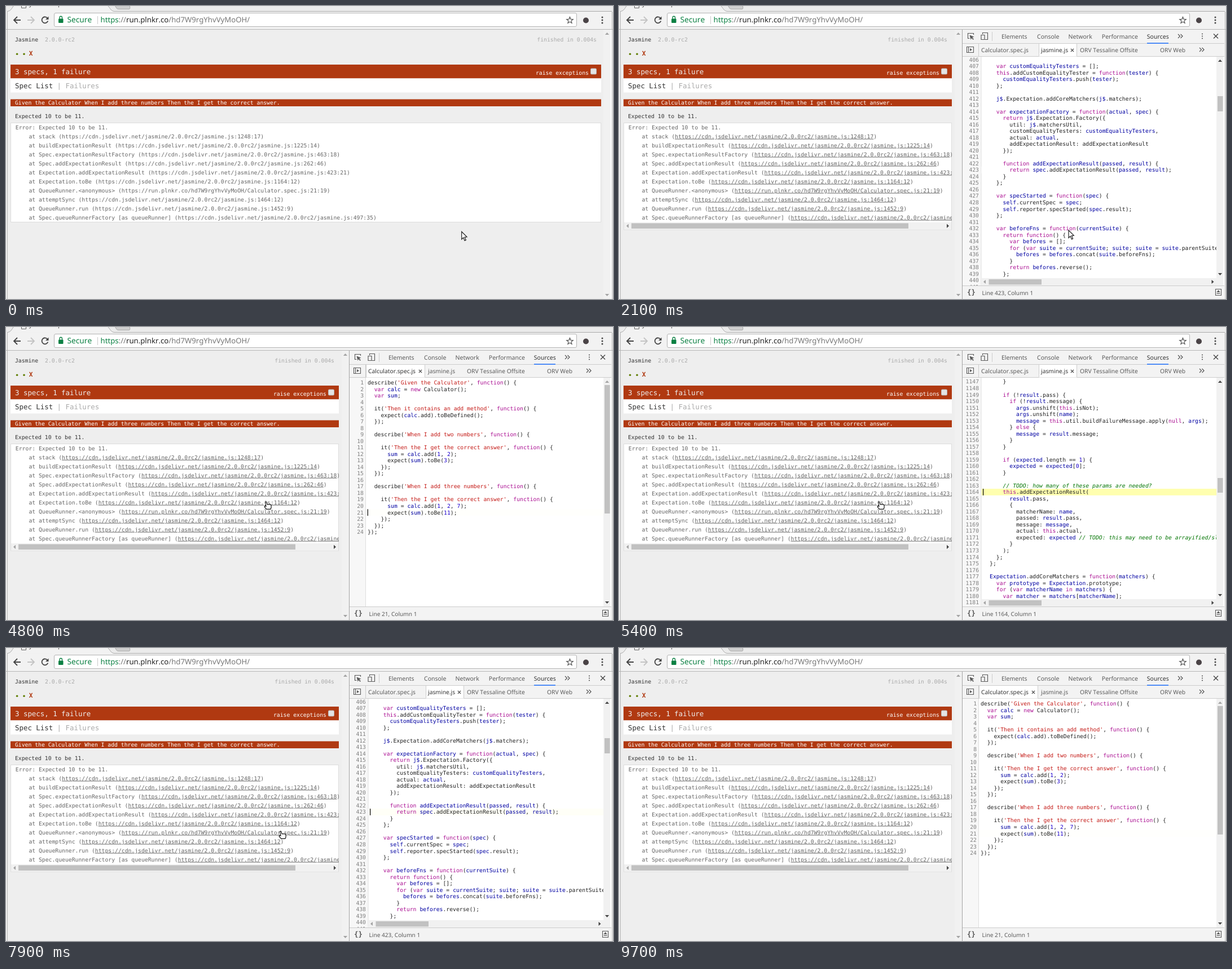
These frames come from a looping animation (1076 by 520 pixels, 9800 ms). An HTML page:

```html
<!DOCTYPE html>
<html lang="en">
<head>
<meta charset="utf-8">
<title>Stack trace navigation</title>
<style>
html, body { margin: 0; width: 100%; height: 100%; overflow: hidden; background: #fff; }
svg { display: block; width: 1076px; height: 520px; }
text { white-space: pre; text-rendering: geometricPrecision; font-kerning: none; }
.m { font-family: "DejaVu Sans Mono", monospace; font-size: 9.75px; }
.b { font-size: 12.4px; }
.x { font-size: 11.2px; }
.u { font-family: "Noto Sans", "Open Sans", sans-serif; }
.linked .url { text-decoration: underline; }
.kw { fill: #aa0d91; }
.str { fill: #c41a16; }
.num { fill: #1c00cf; }
.loc { fill: #0000a2; }
.com { fill: #007400; font-style: italic; }
.plain tspan { fill: #222; font-style: normal; }
</style>
</head>
<body>
<svg id="stage" viewBox="0 0 1076 520" xmlns="http://www.w3.org/2000/svg"></svg>
<script>
const LOOP = 9800, STEP = 100;
const LINE = 11.52;
const GREY = '#5a5a5a', RED = '#b03911', EDGE = '#ccc';

const esc = s => s.replace(/&/g, '&amp;').replace(/</g, '&lt;');
const rect = (x, y, w, h, fill, more = '') =>
  `<rect x="${x}" y="${y}" width="${w}" height="${h}" fill="${fill}" ${more}/>`;
const path = (d, stroke, w = 1.3, fill = 'none') =>
  `<path d="${d}" stroke="${stroke}" stroke-width="${w}" fill="${fill}"/>`;
const disc = (x, y, r, fill) => `<circle cx="${x}" cy="${y}" r="${r}" fill="${fill}"/>`;
const mono = (x, y, s, fill, more = '', cls = '') =>
  `<text class="m ${cls}" x="${x}" y="${y}" fill="${fill}" ${more}>${s}</text>`;
const ui = (x, y, s, size, fill = GREY) =>
  `<text class="u" x="${x}" y="${y}" font-size="${size}" fill="${fill}">${s}</text>`;
const group = (id, body) => `<g id="${id}">${body}</g>`;

// Scrollbar arrow head: direction is one of u, d, l, r
const arrow = (x, y, dir, fill) => {
  const turn = { u: 0, r: 90, d: 180, l: 270 }[dir];
  return `<path d="M-3.6 2L0-2 3.6 2Z" fill="${fill}" transform="translate(${x} ${y}) rotate(${turn})"/>`;
};
const dots = (x, y, r, gap, fill) => [-gap, 0, gap].map(d => disc(x, y + d, r, fill)).join('');
const chevrons = (x, y) =>
  path(`M${x} ${y - 3.5}l3.5 3.5-3.5 3.5M${x + 4.5} ${y - 3.5}l3.5 3.5-3.5 3.5`, GREY);
const cross = (x, y, r, w) =>
  path(`M${x - r} ${y - r}l${2 * r} ${2 * r}M${x + r} ${y - r}l${-2 * r} ${2 * r}`, '#444', w);

/* ---------- browser frame ---------- */
function browser() {
  const star = Array.from({ length: 10 }, (_, i) => {
    const a = (i * 36 - 90) * Math.PI / 180, r = i % 2 ? 2.6 : 6;
    return `${(999.5 + r * Math.cos(a)).toFixed(2)} ${(25.5 + r * Math.sin(a)).toFixed(2)}`;
  }).join('L');
  return rect(0, 0, 1076, 520, '#f2f2f2') +
    rect(0, 0, 1076, 9, '#ebebeb') +
    path('M2 9.5C9 9 10 4 14-1H180C185 4 186 9 192 9.5', '#a9a9a9', 1, '#f2f2f2') +
    path('M192 9.5H1074', '#a9a9a9', 1) +
    path('M193-1L196 4Q197 5.5 200 5.5H218Q221 5.5 219-1Z', '#aaa', 1, '#cfcfcf') +
    path('M27.5-1V3.5H35.5V-1', '#666', 1) +
    ui(41, 0, 'y', 10.4, '#444') + ui(92, 0, 'p', 10.4, '#444') +
    path('M26 25H14.5M20 19l-6 6 6 6', '#444', 1.8) +
    path('M38 25H49.5M44 19l6 6-6 6', '#c4c4c4', 1.8) +
    path('M73.5 21.5A5.5 5.5 0 1 0 74.3 26.5', '#444', 1.8) +
    '<path d="M75.5 18.5V24H70Z" fill="#444"/>' +
    rect(85.5, 12.5, 926, 24, '#fff', 'rx="2.5" stroke="#b3b3b3"') +
    rect(93, 22.5, 8.5, 7.5, '#0b8043', 'rx="1"') +
    path('M95 23V20.5a2.25 2.25 0 0 1 4.5 0V23', '#0b8043', 1.3) +
    ui(108.5, 29.3, 'Secure', 13.7, '#0b8043') +
    rect(162, 18, 1, 14, '#c8c8c8') +
    ui(167.5, 29.3, '<tspan fill="#0b8043">https</tspan>://<tspan fill="#222">run.plnkr.co</tspan>/hd7W9rgYhvVyMoOH/', 13.2, '#777') +
    path(`M${star}Z`, '#555', 1.2) +
    disc(1028, 25.5, 5, '#4a4346') +
    dots(1057, 25, 1.5, 5, '#444') +
    rect(3, 42, 1071, 478, '#fff') +
    rect(0, 41, 1076, 1, '#b6b6b6') +
    rect(2, 10, 1, 510, '#b0b0b0') + rect(1074, 10, 1, 510, '#b0b0b0');
}

/* ---------- test report ---------- */
const CDN = 'https://cdn.jsdelivr.net/jasmine/2.0.0rc2/jasmine.js:';
const STACK = [
  ['stack', CDN + '1248:17'],
  ['buildExpectationResult', CDN + '1225:14'],
  ['Spec.expectationResultFactory', CDN + '463:18'],
  ['Spec.addExpectationResult', CDN + '262:46'],
  ['Expectation.addExpectationResult', CDN + '423:21'],
  ['Expectation.toBe', CDN + '1164:12'],
  ['QueueRunner.<anonymous>', 'https://run.plnkr.co/hd7W9rgYhvVyMoOH/Calculator.spec.js:21:19'],
  ['attemptSync', CDN + '1464:12'],
  ['QueueRunner.run', CDN + '1452:9'],
  ['Spec.queueRunnerFactory [as queueRunner]', CDN + '497:35'],
];

function report(id, right, scrolls) {
  const w = right - 8, bar = right + (scrolls ? 5 : 4);
  const trace = STACK.map(([fn, url], i) =>
    mono(40.4, 234.7 + 16 * i, `at ${esc(fn)} (<tspan class="url">${url}</tspan>)`, '#666')).join('');
  return group(id,
    rect(3, 42, bar + 10, 478, '#eee') +
    rect(bar, 42, 13, 478, '#f1f1f1') +
    arrow(bar + 6.5, 49, 'u', '#a3a3a3') + arrow(bar + 6.5, 513, 'd', '#a3a3a3') +
    mono(16, 63, 'Jasmine', '#333') + mono(69, 63, '2.0.0-rc2', '#aaa') +
    mono(right - 8, 63, 'finished in 0.004s', '#aaa', 'text-anchor="end"') +
    disc(19.6, 85.3, 1.8, '#5e7d00') + disc(32, 85.3, 1.8, '#5e7d00') +
    mono(40.7, 88, 'X', RED, 'font-weight="bold"', 'x') +
    rect(8, 104, w, 24.5, RED) +
    mono(16, 120.7, '3 specs, 1 failure', '#eee', '', 'b') +
    mono(right - 116, 122.3, 'raise exceptions', '#fff') +
    rect(right - 18.5, 111, 10, 10, '#e4e4e4', 'rx="1.5" stroke="#b9b9b9"') +
    rect(8, 128.5, w, 25, '#fff') +
    mono(16, 145.5, 'Spec List <tspan fill="#aaa">| Failures</tspan>', '#333', '', 'b') +
    rect(8, 165.5, w, 12.5, RED) +
    mono(16, 174.8, 'Given the Calculator When I add three numbers Then the I get the correct answer.', '#fff') +
    mono(16, 199.3, 'Expected 10 to be 11.', '#333') +
    rect(8.5, 207.5, w - 1, scrolls ? 189.5 : 176, '#fff', 'stroke="#ddd"') +
    `<g clip-path="url(#${scrolls ? 'cutNarrow' : 'cutWide'})">` +
    mono(16.8, 219, 'Error: Expected 10 to be 11.', '#666') + trace + '</g>' +
    (scrolls ? rect(9, 384, w - 2, 12.5, '#f1f1f1') + rect(22, 385.5, 491, 9.5, '#c1c1c1') +
      arrow(15, 390.3, 'l', '#a3a3a3') + arrow(583, 390.3, 'r', '#444') : ''));
}

/* ---------- developer tools ---------- */
function toolbar() {
  const tab = (x, s, fill) => ui(x, 57.5, s, 10.5, fill);
  return group('tools',
    rect(608, 42, 466, 478, '#fff') + rect(608, 42, 1, 478, '#a3a3a3') +
    rect(609, 42, 464, 24, '#f3f3f3') + rect(609, 66, 464, 1, EDGE) +
    path('M621.5 57.5H618.5V48.5H628.5V51', GREY, 1.2) +
    `<path d="M621.5 51.5l8 3.2-3.3 1.2 2.8 2.8-1.3 1.3-2.8-2.9-1.3 3Z" fill="${GREY}"/>` +
    path('M644.5 50V47.5H653.5V59.5H648.5', GREY, 1.2) +
    path('M642 51.5H648V59.5H642Z', GREY, 1.2, '#f3f3f3') +
    rect(661, 46, 1, 16, EDGE) +
    tab(678, 'Elements') + tab(741, 'Console') + tab(796.5, 'Network') +
    tab(855.8, 'Performance') + tab(935.8, 'Sources', '#333') +
    rect(936, 65.2, 38, 1.8, '#3e82f7') +
    chevrons(991, 53.5) + dots(1034, 53.5, 1.1, 4, GREY) + cross(1058, 53.5, 4, 1.4));
}

function highlight(line) {
  const KEYS = /^(var|new|function|return|if|else|for|in|this|null)$/;
  const OUTER = /^(describe|it|expect|Calculator|addExpectationResult)$/;
  return line.replace(/\/\/.*|'[^']*'|[\w$]+/g, (s, at) => {
    const member = line[at - 1] === '.' || line[at + s.length] === ':';
    const named = line.slice(0, at).endsWith('function ');
    const cls = s.startsWith('//') ? 'com' : s[0] === "'" ? 'str' : /^\d/.test(s) ? 'num' :
      KEYS.test(s) ? 'kw' : member || (OUTER.test(s) && !named) ? '' : 'loc';
    return cls ? `<tspan class="${cls}">${s}</tspan>` : s;
  });
}

const VIEWS = {
  spec: { first: 1, at: 21, mid: 329.1, col: 641, lines: `describe('Given the Calculator', function() {
  var calc = new Calculator();
  var sum;

  it('Then it contains an add method', function() {
    expect(calc.add).toBeDefined();
  });

  describe('When I add two numbers', function() {

    it('Then the I get the correct answer', function() {
      sum = calc.add(1, 2);
      expect(sum).toBe(3);
    });
  });

  describe('When I add three numbers', function() {

    it('Then the I get the correct answer', function() {
      sum = calc.add(1, 2, 7);
      expect(sum).toBe(11);
    });
  });
});` },
  matcher: { first: 1147, at: 1164, mid: 292.9, col: 645.3, thumb: [268, 26], lines: `      }

      if (!result.pass) {
        if (!result.message) {
          args.unshift(this.isNot);
          args.unshift(name);
          message = this.util.buildFailureMessage.apply(null, args);
        } else {
          message = result.message;
        }
      }

      if (expected.length == 1) {
        expected = expected[0];
      }

      // TODO: how many of these params are needed?
      this.addExpectationResult(
        result.pass,
        {
          matcherName: name,
          passed: result.pass,
          message: message,
          actual: this.actual,
          expected: expected // TODO: this may need to be arrayified/sliced
        }
      );
    };
  };

  Expectation.addCoreMatchers = function(matchers) {
    var prototype = Expectation.prototype;
    for (var matcherName in matchers) {
      var matcher = matchers[matcherName];
` },
  factory: { first: 406, at: 423, mid: 291, col: 645.3, thumb: [160, 27], lines: `
    var customEqualityTesters = [];
    this.addCustomEqualityTester = function(tester) {
      customEqualityTesters.push(tester);
    };

    j$.Expectation.addCoreMatchers(j$.matchers);

    var expectationFactory = function(actual, spec) {
      return j$.Expectation.Factory({
        util: j$.matchersUtil,
        customEqualityTesters: customEqualityTesters,
        actual: actual,
        addExpectationResult: addExpectationResult
      });

      function addExpectationResult(passed, result) {
        return spec.addExpectationResult(passed, result);
      }
    };

    var specStarted = function(spec) {
      self.currentSpec = spec;
      self.reporter.specStarted(spec.result);
    };

    var beforeFns = function(currentSuite) {
      return function() {
        var befores = [];
        for (var suite = currentSuite; suite; suite = suite.parentSuite) {
          befores = befores.concat(suite.beforeFns);
        }
        return befores.reverse();
      };

` },
};

function editor(id, v) {
  const isSpec = id === 'spec', edge = isSpec ? 637 : 641.5;
  const bottom = isSpec ? 496 : 483;
  const [thumbY, thumbH] = v.thumb || [103, 228];
  const base = n => v.mid + 3.4 + (n - v.at) * LINE;
  const lines = v.lines.split('\n');
  const numbers = lines.map((_, i) =>
    mono(isSpec ? 634 : 638, base(v.first + i), v.first + i, '#808080', 'text-anchor="end"')).join('');
  const code = lines.map((s, i) => s && mono(v.col, base(v.first + i), highlight(s), '#222')).join('');
  const tabBox = (x, w) => rect(x + .5, 67, w, 22.5, '#fff') +
    rect(x, 67, 1, 22, EDGE) + rect(x + w, 67, 1, 22, EDGE);
  const tab = (x, s, fill) => ui(x, 82, s, 10.3, fill);

  return group(id,
    rect(609, 67, 464, 22, '#f3f3f3') + rect(609, 89, 464, 1, EDGE) +
    path('M616.5 72.5H628.5V82.5H616.5ZM619.5 72.5V82.5', GREY, 1.1) +
    `<path d="M622 75l4 2.5-4 2.5Z" fill="${GREY}"/>` + rect(637, 67, 1, 22, EDGE) +
    (isSpec ? tabBox(638, 104) + cross(734.5, 78.5, 2.6, 1.3) : tabBox(744, 67) + cross(803.5, 78.5, 2.6, 1.3)) +
    tab(642, 'Calculator.spec.js', isSpec ? '#333' : GREY) + tab(748, 'jasmine.js', isSpec ? GREY : '#333') +
    tab(817, 'ORV Tessaline Offsite') + tab(959, 'ORV Web') + chevrons(1029, 77.5) +
    '<g clip-path="url(#cutCode)">' +
    rect(609, 90, edge - 609, 406, '#f7f7f7') + rect(edge, 90, 1, 406, '#ddd') + numbers +
    rect(edge + 1, v.mid - 5.8, 1059 - edge - 1, 11.7, '#fff', 'class="flash"') + code +
    rect(v.col - .3, v.mid - 5.8, 1.2, 11.7, '#000', 'class="caret"') + '</g>' +
    rect(1059, 90, 12.5, 406, '#f1f1f1') + rect(1061, thumbY, 9.5, thumbH, '#c1c1c1') +
    arrow(1065.5, 97, 'u', isSpec ? '#a3a3a3' : '#444') + arrow(1065.5, bottom - 7, 'd', '#444') +
    (isSpec ? '' : rect(642, 483, 417, 13, '#f1f1f1') + rect(655.5, 485, 93.5, 9.5, '#c1c1c1') +
      arrow(648, 489.5, 'l', '#a3a3a3') + arrow(1052.5, 489.5, 'r', '#444')) +
    rect(609, 496, 464, 24, '#f3f3f3') + rect(609, 496, 464, 1, EDGE) +
    mono(617, 512, '{}', GREY, 'font-weight="bold"', 'b') +
    ui(643.5, 512.7, `Line ${v.at}, Column 1`, 10.15) +
    path('M1057.5 502.5H1067.5V513.5H1057.5Z', GREY, 1.1) +
    `<path d="M1059.5 508l3-4 3 4Z" fill="${GREY}"/>` + rect(1059.5, 509.5, 6, 1.3, GREY));
}

/* ---------- scene ---------- */
const clip = (id, x, y, w, h) => `<clipPath id="${id}">${rect(x, y, w, h, '#000')}</clipPath>`;
const stage = document.getElementById('stage');
stage.innerHTML =
  '<defs>' + clip('cutWide', 9, 208, 1045, 176) + clip('cutNarrow', 9, 208, 581, 176) +
  clip('cutCode', 609, 90, 450, 406) + '</defs>' +
  browser() + report('wide', 1055, false) + report('narrow', 590, true) + toolbar() +
  Object.entries(VIEWS).map(([id, v]) => editor(id, v)).join('') +
  group('pointer',
    group('tip', path('M.7 .5V14L3.8 11.1 6.1 16.4 8.3 15.4 6 10.3 10 9.9Z', '#222', 1.2, '#fff')) +
    group('hand', path('M2.5 1.9Q3.9 .3 5 2L6 5.8H11Q13.2 6.1 13.1 8.2V11.6L11.9 14.4H4.8L1.4 10.6Q.7 8.7 2.5 8.6L3.9 9.2Z', '#111', 1.2, '#fff')));

const $ = id => document.getElementById(id);
const show = (el, on) => { el.style.display = on ? '' : 'none'; };

// [time, view shown, whether a link was clicked]
const CUES = [[1600, 'factory', false], [3200, 'spec', true], [4900, 'matcher', true],
  [6500, 'factory', true], [8000, 'spec', true]];

// [start, end, x, y]: pointer moves
const MOVES = [[2000, 2900, 495, 326], [4100, 4700, 457, 309], [5500, 6100, 476, 291],
  [7200, 7800, 483, 324], [8400, 9100, 325, 120], [9100, 9600, 300, 9]];

// CSS "ease" timing curve
function ease(p) {
  let lo = 0, hi = 1;
  const curve = (s, a, b) => 3 * (1 - s) ** 2 * s * a + 3 * (1 - s) * s * s * b + s ** 3;
  for (let i = 0; i < 18; i++) {
    const s = (lo + hi) / 2;
    if (curve(s, .25, .25) < p) lo = s; else hi = s;
  }
  return curve(lo, .1, 1);
}

function pointerAt(t) {
  let x = 807, y = 400;
  for (const [from, to, tx, ty] of MOVES) {
    if (t <= from) break;
    const p = Math.min(1, (t - from) / (to - from)), k = p * p * (3 - 2 * p);
    x += (tx - x) * k;
    y += (ty - y) * k;
  }
  return [x, y];
}

function draw(t) {
  show($('wide'), t < 1300);
  show($('narrow'), t >= 1300);
  show($('tools'), t >= 1400);
  $('narrow').classList.toggle('linked', t >= 1700);

  const cue = CUES.filter(c => c[0] <= t).pop();
  for (const id in VIEWS) show($(id), cue && cue[1] === id);
  if (cue) {
    const [start, id, clicked] = cue, el = $(id), age = t - start;
    const blue = clicked ? Math.round(120 + 135 * ease(Math.min(1, age / 2000))) : 255;
    el.classList.toggle('plain', t < 2100);
    el.querySelector('.flash').setAttribute('fill', `rgb(255,255,${blue})`);
    show(el.querySelector('.caret'), clicked && Math.max(0, age - 50) % 1060 < 530 && t < 9600);
  }

  const [x, y] = pointerAt(t);
  const onLink = t >= 1700 && x < 590 && y > 222;
  $('pointer').setAttribute('transform', `translate(${x.toFixed(1)} ${y.toFixed(1)})`);
  show($('pointer'), t < 9700);
  show($('hand'), onLink);
  show($('tip'), !onLink);
}

function tick() {
  draw(Math.floor(performance.now() % LOOP / STEP) * STEP);
  requestAnimationFrame(tick);
}
tick();
</script>
</body>
</html>
```
